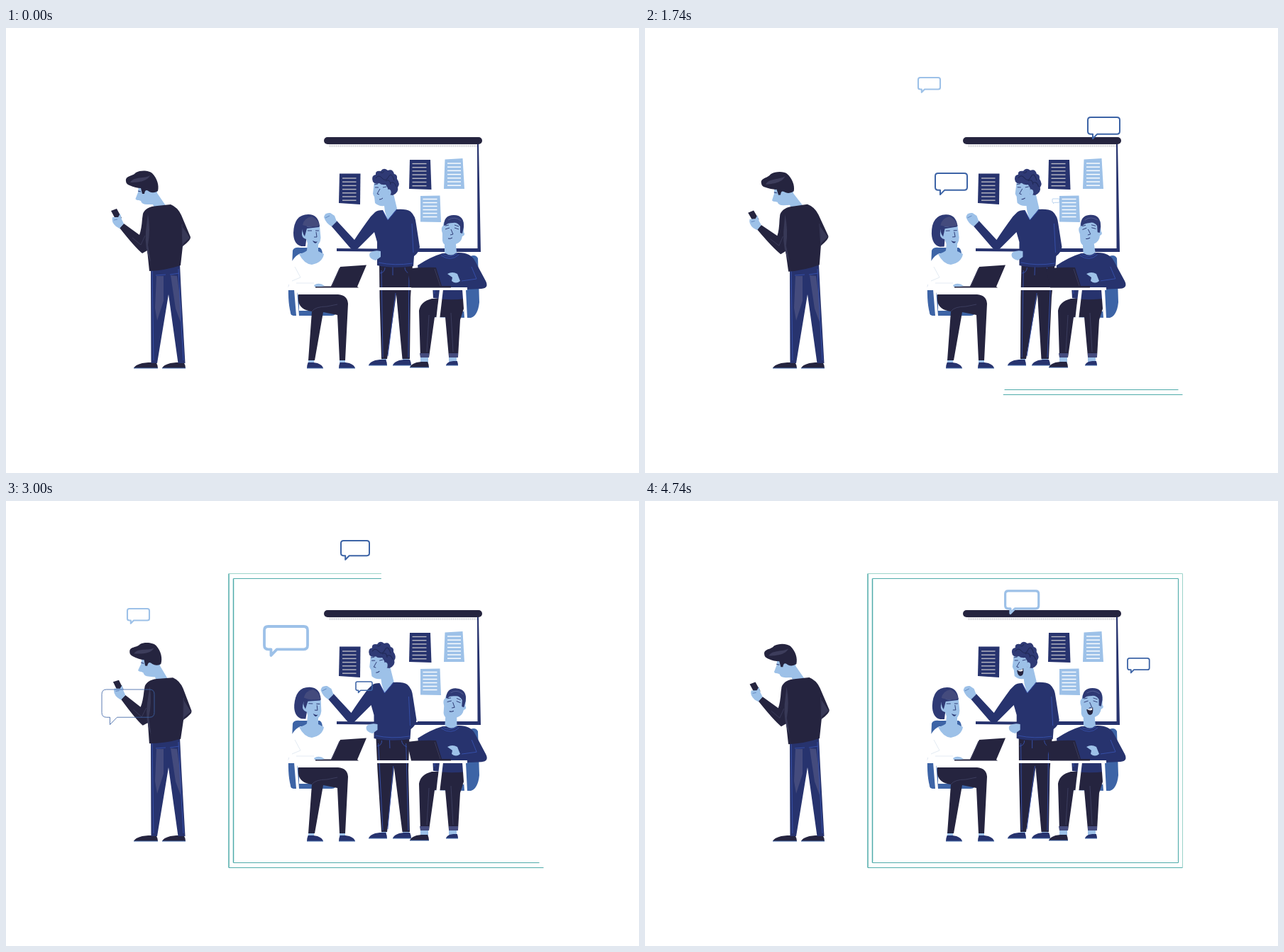
These frames come from a looping animation (892 px wide and 628 px high, 4800 ms). An HTML page with a canvas:

```html
<!DOCTYPE html>
<html lang="en">
<head>
<meta charset="utf-8">
<title>Team meeting</title>
<style>
html, body { margin: 0; width: 100%; height: 100%; overflow: hidden; background: #fff; }
canvas { display: block; }
</style>
</head>
<body>
<canvas id="stage" width="892" height="628"></canvas>
<script>
const ctx = document.getElementById('stage').getContext('2d');
const LOOP = 4800, STEP = 60;
const INK = '#25243f', NAVY = '#27336e', SKIN = '#9dc1e8', BLUE = '#3d64a6', SEAM = '#3752ad',
      HAIR = '#2f3a75', SOFT = '#444b7d', WHITE = '#fff', TEAL = '#4fabaa', MINT = '#9ed5cb';

const clamp = v => Math.max(0, Math.min(1, v));

function fill(color, d) {
  ctx.fillStyle = color;
  ctx.fill(new Path2D(d));
}

function line(color, width, d) {
  ctx.strokeStyle = color;
  ctx.lineWidth = width;
  ctx.stroke(new Path2D(d));
}

function turned(x, y, angle, draw) {
  ctx.save();
  ctx.translate(x, y);
  ctx.rotate(angle);
  ctx.translate(-x, -y);
  draw();
  ctx.restore();
}

// The toe is at x; a negative width points it to the right.
function shoe(x, y, w, h = 7, color = NAVY) {
  fill(color, `M${x} ${y + h}Q${x + w * .05} ${y + h * .45} ${x + w * .35} ${y + h * .12}L${x + w * .6} ${y}H${x + w * .93}Q${x + w} ${y + h * .5} ${x + w} ${y + h}Z`);
  line(BLUE, 1, `M${x} ${y + h}H${x + w}`);
}

function openMouth(x, y, w, h) {
  fill(INK, `M${x} ${y + 1}Q${x + w * .6} ${y + 1} ${x + w} ${y - 2}Q${x + w + 1} ${y + h} ${x + w * .55} ${y + h}Q${x + 1} ${y + h} ${x} ${y + 1}Z`);
  fill(WHITE, `M${x + 1} ${y + 1}Q${x + w * .6} ${y + 1} ${x + w - 1} ${y - 1}L${x + w - 1} ${y + h * .2}Q${x + w * .5} ${y + h * .4} ${x + 1} ${y + 1}Z`);
}

function sheet(color, ink, d, x, y, w, rows, gap) {
  fill(color, d);
  for (let i = 0; i < rows; i++) line(ink, 1.4, `M${x} ${y + i * gap}h${w}`);
}

function board() {
  fill('#ececee', 'M455 164H665V168H455Z');
  ctx.setLineDash([1, 2]);
  line('#dcdce0', 3, 'M456 166.5H664');
  ctx.setLineDash([]);
  fill(NAVY, 'M664 163H666L669 316H580V311H664.5Z');
  fill(NAVY, 'M466 311L580 312V316L466 315Z');
  ctx.lineCap = 'round';
  line(INK, 10, 'M453 159H666');
  ctx.lineCap = 'butt';
  sheet(NAVY, '#b9b9c2', 'M470 205.500H499.500L499 249L469 247Z', 474, 212, 19.500, 7, 5.2);
  sheet(NAVY, '#b9b9c2', 'M569 186H598L599.500 228L568 227Z', 572.500, 191.500, 20, 7, 5.2);
  sheet(SKIN, WHITE, 'M618.500 185.500L643.500 184L646 227L617 227Z', 622, 191, 19, 7, 5.2);
  sheet(SKIN, WHITE, 'M584 237L611.500 236.500L613 274L584 273.500Z', 587.500, 241.500, 20, 6, 5);
}

function phoneMan(s) {
  fill(SKIN, 'M205 466H212V474H205ZM243 466H250L251 474H243Z');
  shoe(180, 472, 34, 8, INK);
  shoe(220, 472, 33, 8, INK);
  fill(NAVY, 'M204 338L245 334L247 375L252.500 473L242.500 473L229 376L213 473H204.500Z');
  fill(SOFT, 'M212 350L222 350L222 385L213 413L210 395ZM232 349L241 350L247 394L246 415L239 396Z');
  line(SEAM, .9, 'M206 342L208 469M243 340L246 400L250 469M211 349L225 348M231 348L244 346');
  turned(225, 340, s * .035, () => {
    turned(208, 245, s * .03, () => {
      fill(SKIN, 'M187 222L186 232L182.500 241Q183 243 187 243L190 244Q191 249 199 249L207 249L210 256L226 252L213 233V222Z');
      fill(INK, 'M169 216C168 208 178 210 183 204C190 200 202 201 206 205C213 212 216 222 214 230Q208 234 202 231Q196 226 195 234L192 234L190 226Q183 226 174 222Q169 220 169 216Z');
      fill('#3d3d5c', 'M175 218C180 209 196 213 203 208C199 217 185 218 175 218Z');
      line(NAVY, 1, 'M186 230L190 231');
    });
    fill(INK, 'M193 262Q197 252 213 251L232 249Q242 253 247 264L260 295Q261 299 249 308L246 335Q225 342 202 343L199 314L192 318Q182 310 160 282L166 276L188 292Q191 284 192 269Z');
    fill('#383957', 'M200 262Q204 285 200 306L204 330Q195 312 197 287ZM249 281L259 296L249 305Z');
    line('#3d3e5e', .8, 'M196 293L190 306L178 296M248 277L249 308');
    fill(INK, 'M148 258L156 255L163 268L156 273Z');
    fill(SKIN, 'M150 267L158 267L161 262L163 270L166 276L160 283L155 280Q148 274 150 267Z');
    line(BLUE, .6, 'M152 271L157 270');
  });
}

function presenter(s, talk) {
  const shift = -4.5 * s, lean = shift / 130;
  fill(SKIN, 'M529 464H536V471H529ZM559 464H568V471H559Z');
  shoe(511, 468, 26, 8);
  shoe(545, 468, 26, 8);
  ctx.save();
  ctx.transform(1, 0, -lean, 1, lean * 466, 0);
  fill(INK, 'M526 334H573L570 380L569 467H558.500L550 376L537 467H529L526.500 380Z');
  line(SEAM, .9, 'M529 342L531 465M568 342L567 465M549 374L538 463M527 346Q534 345 534 338M545 337V349M569 347Q562 344 562 338');
  ctx.restore();
  ctx.save();
  ctx.translate(shift, 0);
  turned(542, 258, -s * .01, () => {
    fill(SKIN, 'M519 216L517 234Q518 237 519 238L520 247Q525 252 533 251L534 259L538 272L552 259L546 234L549 220L541 209Z');
    fill(HAIR, 'M517 217Q514 208 521 207Q520 201 528 202Q532 196 538 201Q545 198 547 206Q552 207 551 213Q556 220 552 225Q554 232 545 236L538 235V226L535 221Q529 222 526 219Q520 221 517 217Z');
    line('#202956', 1, 'M521 212Q525 206 530 212T539 210T547 215M528 204Q531 206 533 202M541 219Q547 215 550 224M535 216Q541 212 542 221');
    fill(SKIN, 'M537 232Q537 225 542 229Q544 234 539 239Z');
    line(NAVY, .9, 'M520 225H525M531 225L536 224M527 227L523 234L526 235M519 221L524 220M531 220L536 220');
    if (talk > 0) openMouth(523.500, 240 - 2 * talk, 7 + 2 * talk, 4 + 5 * talk);
    else line(NAVY, 1, 'M526 242Q529 242 531 240');
  });
  fill(NAVY, 'M520 260Q523 257 531 257L538 271L550 256Q564 255 570 259Q577 265 578 277L583 309Q582 317 575 322L574 336Q545 340 523 335L523 302L519 288L495 312Q489 316 483 308L458 279L466 272L491 299Q500 285 514 266Z');
  line(SEAM, .9, 'M531 258L538 271L550 257M572 276L574 317M525 331Q548 336 573 332');
  fill(SKIN, 'M466 273L459 280Q451 276 448 267Q449 260 457 261L463 265Z');
  line(BLUE, .6, 'M450 268L456 265');
  fill(SKIN, 'M513 317Q519 313 528 315V323L521 328Q512 326 512 320Z');
  ctx.restore();
}

function woman(s) {
  fill(BLUE, 'M404 314Q406 309 414 310L442 310Q445 311 446 318L432 345L402 360ZM398 362Q408 365 413 380V403L402 405Q397 390 398 362ZM401 399H465Q466 406 459 406H405Q400 405 401 399Z');
  fill(WHITE, 'M403 329Q409 320 415 318L445 318Q452 330 449 347L456 366H398Q399 342 403 329Z');
  fill(SKIN, 'M413 319Q421 317 424 314L425 302H440V315L448 319Q446 331 431 334Q420 333 413 319Z');
  line('#e3ebf3', 1, 'M407 337L415 352L403 357M409 360L434 360');
  turned(431, 315, s * .045, () => {
    fill(HAIR, 'M416 308Q405 305 405 289Q406 263 426 263Q440 263 442 279L439 284H425L422 308Z');
    fill(SKIN, 'M418 284L425 279H442L443.500 296Q443 307 434 308L426 307L423 298Q416 296 417 289Z');
    fill(SOFT, 'M418 278Q420 268 431 266Q440 270 442 280Q431 283 418 278Z');
    fill(HAIR, 'M419 279Q431 282 442 279L441 281L424 283L421 294Q416 288 419 279Z');
    line(NAVY, .9, 'M425 286H431M436 286H441M437 288L438 295L434 295');
    fill(NAVY, 'M432 300Q437 303 439 301Q436 307 432 300Z');
  });
  fill(SKIN, 'M426 467H434V475H426ZM470 467H478V475H470Z');
  shoe(447, 472, -23, 8);
  shoe(492, 472, -23, 8);
  fill(INK, 'M412 376H468Q481 377 482 389L478 469H470L467 405L447 401L435 469H426L431 400Q414 398 412 385Z');
  line('#414365', .8, 'M431 400Q436 393 452 393L467 390');
}

function seatedMan(s, laugh) {
  fill(BLUE, 'M649 325Q661 317 665 325L667 387Q665 406 655 409L583 408V402L645 400Z');
  fill(SKIN, 'M584 464H595V473H584ZM624 464H635V473H624Z');
  shoe(569, 471, 27, 8, INK);
  shoe(620, 470, 17, 6);
  fill(INK, 'M600 382H647L645 396L640 412L637 464H624L619 408L604 408L596 465H584L582 399Q584 386 600 382Z');
  fill(SOFT, 'M583 459L596 459V465H584ZM624 459L637 459V465H624Z');
  line('#414365', .8, 'M596 405L593 457M627 402L630 457M607 408L608 390');
  turned(625, 382, s * .006, () => {
    fill(NAVY, 'M580 335Q598 323 615 318L638 317Q655 317 661 329L676 357Q681 367 670 368L648 369L648 382Q622 385 602 381L601 362L582 350Z');
    line(SEAM, .9, 'M615 319Q626 326 636 318M613 321Q627 330 638 320M656 337L663 354L642 357M603 346L604 375');
    turned(627, 318, s * .06, () => {
      fill(SKIN, 'M618 303V317Q627 324 635 317L634 305Q642 302 643 294Q648 292 645 288L645 274H617L616 279Q612 282 615 290L615 300Q616 307 623 307Z');
      fill(HAIR, 'M617 279Q617 264 631 264Q646 264 645 281L643 290L640 289L640 280Q636 274 630 275Q622 275 620 278Z');
      line('#505b92', 1, 'M623 271Q632 265 641 272');
      line(NAVY, .9, 'M619 284L625 282M632 282L638 284M619 279L624 278M632 278L638 280M627 284L630 291L626 292');
      if (laugh > 0) openMouth(622.500, 295 - 2 * laugh, 9, 3 + 6 * laugh);
      else line(NAVY, 1, 'M623 297Q626 298 629 296');
    });
  });
}

function table() {
  fill(WHITE, 'M380 366H650V370H380ZM406 369H410L413 406H409ZM611 369H616L611 412H606ZM643 369H648L650 409H646Z');
  fill(INK, 'M471 337L508 334.500L495 365L497 366.500H436V364.500H458Z');
  line('#414262', 1, 'M470 339L459 364');
  fill(SKIN, 'M434 363Q441 358 449 364L444 365H435Z');
  fill(INK, 'M565 340Q586 337 606 338L614 364H627V366.500H571Z');
  line('#3b3b5a', 1, 'M604 340L612 364');
  fill(SKIN, 'M622 347Q629 343 636 347L640 357Q634 362 628 357L629 352Z');
}

// Two nested outlines, drawn clockwise from the lower right corner.
function borderFrame(t) {
  const part = clamp((t - 1352) / 2636);
  if (!part) return;
  const trace = (l, top, r, b, colors) => {
    const corners = [[r, b], [l, b], [l, top], [r, top], [r, b]];
    let left = part * 2 * (r - l + b - top);
    for (let i = 0; i < 4 && left > 0; i++) {
      const [x, y] = corners[i], [u, v] = corners[i + 1];
      const size = Math.abs(u - x) + Math.abs(v - y), k = Math.min(1, left / size);
      line(colors[i], i === 1 ? 1.5 : 1.1, `M${x} ${y}L${x + (u - x) * k} ${y + (v - y) * k}`);
      left -= size;
    }
  };
  trace(314, 102.500, 757.500, 517.500, [TEAL, TEAL, MINT, MINT]);
  trace(320.500, 109.500, 751.500, 510.500, [TEAL, TEAL, TEAL, TEAL]);
}

// Keys: time, left, top, width.
const bubbles = [
  { color: SKIN, thick: 2.2, end: 3810, taper: 580, keys: [[240, 537, 238, 3], [540, 547, 177, 24], [840, 531, 133, 31], [1080, 499, 102, 31], [1740, 385, 70, 31], [2460, 253, 102, 31], [3000, 171, 152, 31], [3300, 140, 170, 46], [3600, 112, 177, 90], [3780, 108, 178, 98]] },
  { color: BLUE, thick: 2, end: 3180, taper: 430, keys: [[300, 444, 286, 2], [840, 401, 198, 45], [1200, 396, 196, 45], [1740, 409, 205, 45], [2460, 220, 247, 45], [3000, 135, 266, 74], [3180, 135, 267, 80]] },
  { color: BLUE, thick: 2, end: 2760, taper: 380, keys: [[780, 649, 280, 3], [840, 650, 275, 12], [1740, 624, 126, 45], [2160, 723, 140, 48], [2460, 780, 164, 54], [2760, 810, 188, 60]] },
  { color: SKIN, thick: 3.8, end: 3360, taper: 300, keys: [[1680, 576, 243, 5], [1740, 574, 241, 10], [2460, 445, 176, 46], [3000, 364, 177, 61], [3360, 326, 190, 68]] },
  { color: BLUE, thick: 2, end: 3480, taper: 400, keys: [[1980, 436, 286, 3], [2460, 445, 111, 37], [2700, 455, 82, 39], [3000, 472, 56, 40], [3240, 484, 31, 41], [3480, 494, 13, 42]] },
  { color: BLUE, thick: 1.8, end: 5400, taper: 400, keys: [[2340, 388, 332, 3], [2460, 394, 326, 15], [3000, 493, 255, 23], [3600, 609, 225, 25], [4200, 661, 221, 28], [4800, 682, 222, 31]] },
  { color: SKIN, thick: 3.2, end: 5400, taper: 400, keys: [[3180, 626, 289, 3], [3600, 575, 148, 31], [4320, 508, 127, 47], [4800, 508, 127, 47]] }
];

// Smooth curve through the keys.
function sample(keys, t) {
  const i = Math.min(keys.findLastIndex(k => k[0] <= t), keys.length - 2);
  const a = keys[i], b = keys[i + 1], before = keys[i - 1] || a, after = keys[i + 2] || b;
  const span = b[0] - a[0], p = clamp((t - a[0]) / span), q = 1 - p;
  return [1, 2, 3].map(c => {
    const m = (b[c] - before[c]) / (b[0] - before[0]) * span;
    const n = (after[c] - a[c]) / (after[0] - a[0]) * span;
    return a[c] * q * q * (1 + 2 * p) + b[c] * p * p * (3 - 2 * p) + m * p * q * q - n * p * p * q;
  });
}

function drawBubble({ color, thick, end, taper, keys }, t) {
  if (t < keys[0][0] || t >= end) return;
  const [x, y, w] = sample(keys, t), h = w * .53, r = w * .09;
  ctx.lineJoin = 'round';
  line(color, Math.max(.5, Math.min(thick, w * .068) * clamp((end - t) / taper)),
    `M${x + r} ${y}H${x + w - r}q${r} 0 ${r} ${r}V${y + h - r}q0 ${r} ${-r} ${r}H${x + w * .29}L${x + w * .155} ${y + w * .67}V${y + h}H${x + r}q${-r} 0 ${-r} ${-r}V${y + r}q0 ${-r} ${r} ${-r}Z`);
  ctx.lineJoin = 'miter';
}

function render(t) {
  const sway = Math.sin(t / 2400 * Math.PI * 2);
  fill(WHITE, 'M0 0H892V628H0Z');
  board();
  phoneMan(sway);
  presenter(sway, clamp((t - 3450) / 420));
  woman(sway);
  seatedMan(sway, clamp((t - 3840) / 360));
  table();
  borderFrame(t);
  bubbles.forEach(b => drawBubble(b, t));
}

const start = performance.now();
function tick() {
  const t = (performance.now() - start) % LOOP;
  render(Math.floor(t / STEP) * STEP);
  requestAnimationFrame(tick);
}
tick();
</script>
</body>
</html>
```
